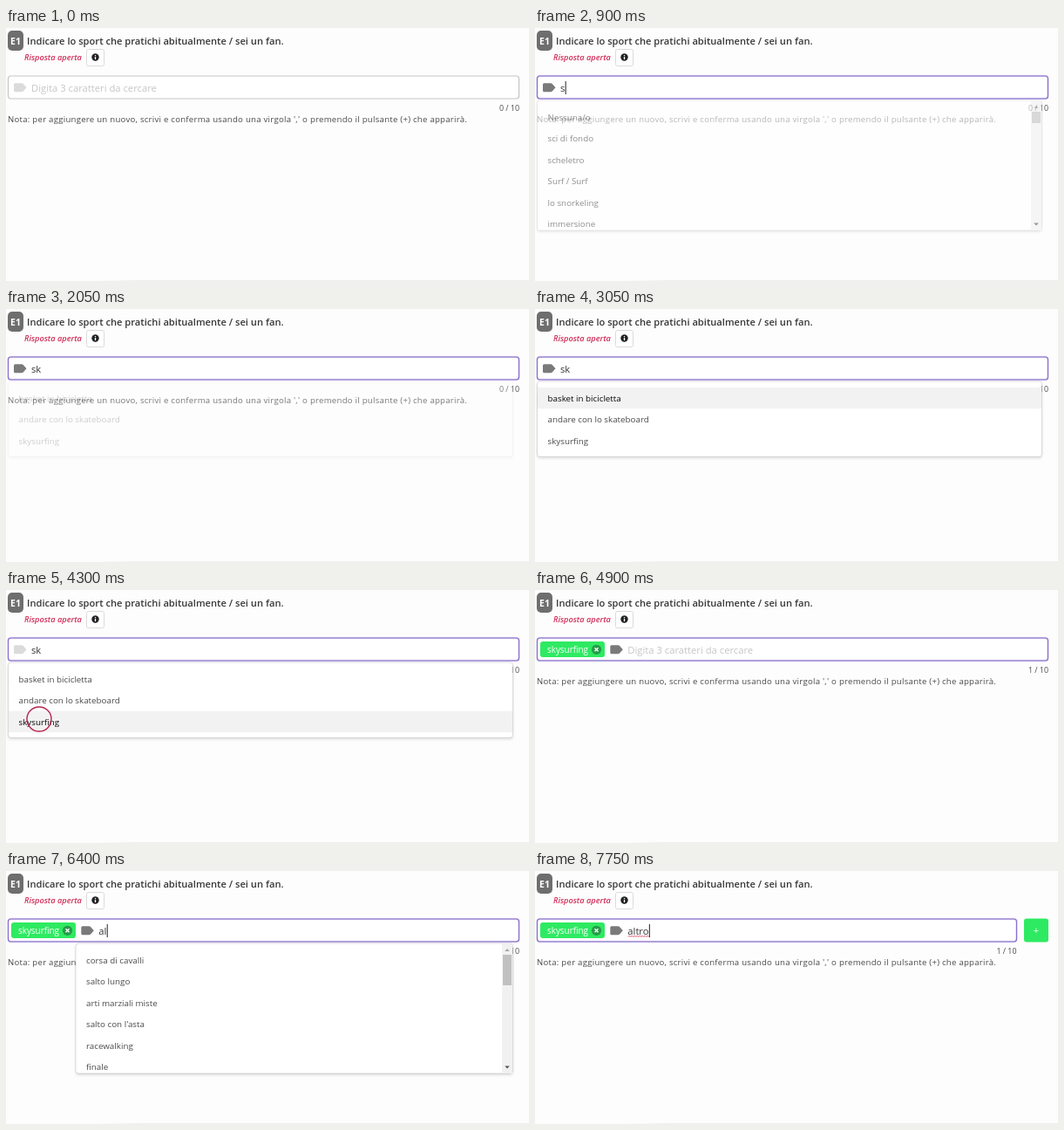
Animation of 600 by 290 pixels, one loop 8000 ms. Source, as an HTML page:

```html
<!DOCTYPE html>
<html lang="it">
<head>
<meta charset="utf-8">
<title>Campo sport con suggerimenti</title>
<style>
  html, body { margin: 0; width: 100%; height: 100%; overflow: hidden; background: #fefdfe; }
  svg { display: block; font-family: "Open Sans", "Noto Sans", sans-serif; fill: #4a4a4a; }
  .input { font-size: 11.25px; }
  .rows { font-size: 9.8px; }
  .note { font-size: 9.6px; letter-spacing: .26px; }
  .count { font-size: 8.9px; text-anchor: end; }
  #sheet { stroke: rgba(10, 10, 10, .12); fill: #fff; filter: drop-shadow(0 2px 1.5px rgba(10, 10, 10, .12)); }
</style>
</head>
<body>
<svg width="600" height="290" viewBox="0 0 600 290">
  <defs>
    <linearGradient id="edge">
      <stop offset="0" stop-color="#eee" stop-opacity="0"/>
      <stop offset=".1" stop-color="#eee"/>
    </linearGradient>
  </defs>
  <rect x="105" y="289" width="495" height="1" fill="url(#edge)"/>

  <rect x="2" y="3" width="18" height="23" rx="5" fill="#6e6e6e"/>
  <text x="11" y="19" font-size="10.5" font-weight="700" text-anchor="middle" fill="#fff">E1</text>
  <text x="24" y="19" font-size="11.15" font-weight="600" fill="#363636">Indicare lo sport che pratichi abitualmente / sei un fan.</text>
  <text x="21" y="37" font-size="9.2" font-weight="600" font-style="italic" fill="#d0305a">Risposta aperta</text>
  <rect x="92.5" y="24.5" width="20" height="19" rx="2" fill="#fff" stroke="#dbdbdb"/>
  <circle cx="102.5" cy="33.5" r="4.2" fill="#222"/>
  <path d="M102.5 30.9v1.3M102.5 33v3" stroke="#fff" stroke-width="1.3"/>

  <rect id="box" x="2.5" y="55" height="26" rx="3" fill="#fff" stroke="#c6c6c6" stroke-width="1.2"/>
  <g id="focus" fill="none" stroke="#7957d5">
    <rect id="glow" x="2.5" y="55" height="26" rx="3" stroke-width="2.4" stroke-opacity=".15"/>
    <rect id="ring" x="2.5" y="55" height="26" rx="3" stroke-width="1.1" stroke-opacity=".75"/>
  </g>
  <g id="chip">
    <rect x="6" y="59" width="74" height="18" rx="3" fill="#2eea62"/>
    <text x="14" y="72.2" font-size="9.9" fill="#fff">skysurfing</text>
    <circle cx="70.5" cy="68.3" r="5.6" fill="#259c48"/>
    <path d="M68.5 66.3l4 4m0-4l-4 4" stroke="#fff" stroke-width="1.4"/>
  </g>
  <g id="entry" class="input">
    <path id="icon" d="M10.5 63.3h7.5q1 0 1.8.8L23.5 68.3l-3.7 4.2q-.8.8-1.8.8h-7.5q-1.5 0-1.5-1.5v-7q0-1.5 1.5-1.5z"/>
    <text id="hint" x="29" y="73" fill="#c6c6c6">Digita 3 caratteri da cercare</text>
    <text id="typed" x="29" y="73" fill="#363636"></text>
    <path id="wave" d="M29.5 75.5l1.5-1.5 1.5 1.5 1.5-1.5 1.5 1.5 1.5-1.5 1.5 1.5 1.5-1.5 1.5 1.5 1.5-1.5 1.5 1.5 1.5-1.5 1.5 1.5 1.5-1.5 1.5 1.5 1.5-1.5 1.5 1.5" fill="none" stroke="#e0405a" stroke-width=".9"/>
    <rect id="caret" y="61" width="1" height="15" fill="#222"/>
  </g>
  <g id="add">
    <rect x="561" y="54.5" width="28" height="27" rx="3" fill="#2eea62"/>
    <text x="575" y="72" font-size="11" text-anchor="middle" fill="#fff">+</text>
  </g>
  <text id="count" class="count" y="95.2"></text>
  <text class="note" x="2" y="107.8">Nota: per aggiungere un nuovo, scrivi e conferma usando una virgola ',' o premendo il pulsante (+) che apparirà.</text>

  <g id="panel">
    <rect id="sheet" y="83" rx="3"/>
    <rect id="hover" height="24.4" fill="#f2f2f2"/>
    <g id="rows" class="rows"></g>
    <g id="bar">
      <rect x="569" y="84" width="12" height="148" fill="#f1f1f1"/>
      <rect id="thumb" x="570" y="96" width="10" fill="#c1c1c1"/>
      <path d="M572.3 92h5.4l-2.7-3z" fill="#a3a3a3"/>
      <path d="M572.3 223.5h5.4l-2.7 3z" fill="#505050"/>
    </g>
  </g>
  <circle id="click" cx="38" cy="148" r="14" fill="none" stroke="#b8234f" stroke-width="1.4"/>
</svg>
<script>
const LOOP = 8000, ROW = 24.4, BLUR = 4200, PICK = 4390, ADD = 6690;
const $ = id => document.getElementById(id);
const set = (id, attrs) => { for (const k in attrs) $(id).setAttribute(k, attrs[k]); };
const show = (id, on) => set(id, { visibility: on ? 'visible' : 'hidden' });
const clamp = v => Math.max(0, Math.min(1, v));
const latest = (list, t) => list.filter(e => e[0] <= t).pop();

// [time, text in the field]; each entry also restarts the caret blink
const keys = [[-1, ''], [250, ''], [745, 's'], [1245, 'sk'], [PICK, ''], [6195, 'a'],
  [6345, 'al'], [6445, 'alt'], [6595, 'altr'], [6740, 'altro']];
// [time, suggestions]
const lists = [
  [-1, ['Nessuna/o', 'sci di fondo', 'scheletro', 'Surf / Surf', 'lo snorkeling', 'immersione']],
  [1500, ['basket in bicicletta', 'andare con lo skateboard', 'skysurfing']],
  [5000, ['corsa di cavalli', 'salto lungo', 'arti marziali miste', "salto con l'asta", 'racewalking', 'finale']],
  [6445, ['salto lungo', "salto con l'asta"]]
];
const hovers = [[-1, -1], [2900, 0], [3750, 1], [3950, 2], [5000, -1]];
const opened = [[780, 1120], [2000, 4330], [6180, 6580]];

const rows = [0, 1, 2, 3, 4, 5].map(i => {
  const row = document.createElementNS('http://www.w3.org/2000/svg', 'text');
  row.setAttribute('y', 106 + ROW * i);
  return $('rows').appendChild(row);
});

function drawField(t) {
  const picked = t >= PICK, adding = t >= ADD;
  const [since, text] = latest(keys, t);
  const focused = t >= 250 && !(t >= BLUR && !picked);
  for (const id of ['box', 'glow', 'ring']) set(id, { width: adding ? 550 : 586 });
  set('focus', { opacity: clamp((t - 50) / 250) });
  set('entry', { transform: `translate(${picked ? 77.3 : 0})` });
  set('icon', { fill: focused ? '#7a7a7a' : '#dbdbdb' });
  show('chip', picked);
  show('add', adding);
  show('hint', !text);
  $('typed').textContent = text;
  set('caret', { x: 29 + (text ? $('typed').getComputedTextLength() + .3 : 0) });
  show('caret', focused && (t - since) % 1000 < 500);
  show('wave', t >= 6850);
  $('count').textContent = (picked ? 1 : 0) + ' / 10';
  set('count', { x: adding ? 552.5 : 589 });
}

function drawPanel(t) {
  const items = latest(lists, t)[1], hover = latest(hovers, t)[1];
  const long = items.length > 3, left = t < 5000 ? 2.5 : 80;
  const alpha = Math.max(...opened.map(([a, b]) => clamp(Math.min((t - a) / 200, 1 - (t - b) / 170))));
  set('panel', { opacity: alpha });
  set('sheet', { x: left, width: 581.5 - left, height: long ? 149 : 13 + ROW * items.length });
  set('hover', { x: left + .5, width: 580.5 - left, y: 89.9 + ROW * Math.max(0, hover) });
  show('hover', hover >= 0);
  rows.forEach((row, i) => {
    row.textContent = items[i] || '';
    row.setAttribute('x', left + 12);
    row.setAttribute('fill', i === hover ? '#0a0a0a' : '#4a4a4a');
  });
  show('bar', long);
  set('thumb', { height: t < 5000 ? 13 : 35 });
}

function draw() {
  const t = performance.now() % LOOP;
  drawField(t);
  drawPanel(t);
  set('click', {
    r: 6 + 8 * clamp((t - BLUR) / 100),
    opacity: t < BLUR ? 0 : clamp((4450 - t) / 100)
  });
  requestAnimationFrame(draw);
}
draw();
</script>
</body>
</html>
```
